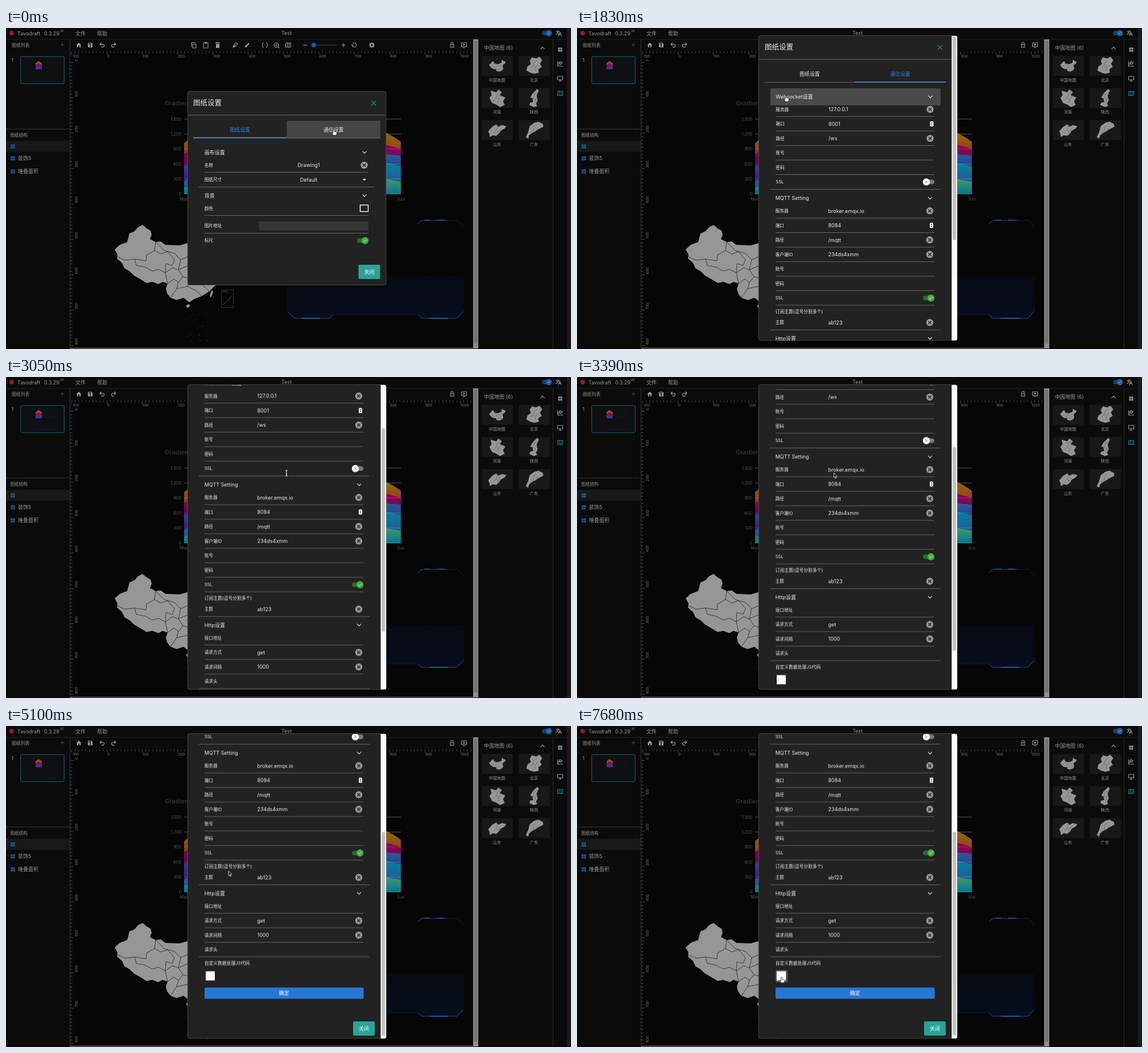
Animation of 993x564 px, one loop 8000 ms. Source, as an HTML page:

```html
<!DOCTYPE html>
<html lang="zh-CN">
<head>
<meta charset="utf-8">
<title>图纸设置</title>
<style>
html, body { margin: 0; width: 100%; height: 100%; overflow: hidden; background: #0b0b0b; }
svg { display: block; }
text { font-family: Inter, 'Noto Sans CJK SC', 'Noto Sans CJK', sans-serif; white-space: pre; }
.ic { fill: none; stroke: #999; stroke-width: 1.1; stroke-linejoin: round; stroke-linecap: round; }
.a { animation: 8s infinite both; }
.small { animation-name: small; animation-timing-function: step-end; }
.big { animation-name: big; animation-timing-function: step-end; }
.out { animation-name: out; }
.in { animation-name: in; }
.bar { animation-name: bar; }
.scroll { --k: -1; animation-name: scroll; }
.thumb { --k: .68; animation-name: scroll; }
.row { animation-name: row; }
.nudge { animation-name: nudge; animation-timing-function: step-end; }
.js { animation-name: js; }
.cursor { animation-name: move; animation-timing-function: ease-in-out; }
.hand { animation-name: hand; animation-timing-function: step-end; }
.beam { animation-name: beam; animation-timing-function: step-end; }
.arrow { animation-name: arrow; animation-timing-function: step-end; }
@keyframes small { 0% { visibility: visible } 3.5%, 100% { visibility: hidden } }
@keyframes big { 0% { visibility: hidden } 3.5%, 100% { visibility: visible } }
@keyframes out {
  0%, 3.5% { transform: none; animation-timing-function: cubic-bezier(.215,.61,.355,1) }
  7.5%, 100% { transform: translateX(-330px) }
}
@keyframes in {
  0%, 3.5% { transform: translateX(330px); animation-timing-function: cubic-bezier(.215,.61,.355,1) }
  7.5%, 100% { transform: none }
}
@keyframes bar {
  0%, 3.5% { transform: translateX(-159px); animation-timing-function: cubic-bezier(.4,0,.2,1) }
  6.7%, 100% { transform: none }
}
@keyframes scroll {
  0%, 36.25% { transform: none; animation-timing-function: cubic-bezier(.4,.3,.7,.8) }
  38.125% { transform: translateY(calc(var(--k) * 109px)); animation-timing-function: cubic-bezier(.08,.6,.3,1) }
  46%, 56.75% { transform: translateY(calc(var(--k) * 163px)); animation-timing-function: cubic-bezier(.3,.3,.5,1) }
  61%, 100% { transform: translateY(calc(var(--k) * 251.5px)) }
}
@keyframes row { 0%, 17.6% { opacity: 0 } 21%, 30% { opacity: 1 } 33%, 100% { opacity: 0 } }
@keyframes nudge { 0% { transform: none } 20% { transform: translateX(.6px) } 33%, 100% { transform: none } }
@keyframes js { 0%, 94% { opacity: 0 } 95.8%, 100% { opacity: 1 } }
@keyframes move {
  0%, 11.375% { transform: translate(576px,178px) }
  21.375%, 29.625% { transform: translate(367px,119px) }
  33.75%, 40% { transform: translate(493px,169px) }
  46%, 49.375% { transform: translate(365px,166px) }
  55%, 60% { transform: translate(422px,189px); animation-timing-function: ease-in }
  63.75% { transform: translate(391px,254px); animation-timing-function: ease-out }
  66.5%, 66.875% { transform: translate(349px,281px) }
  69.625%, 78.5% { transform: translate(360px,292px) }
  88.5%, 88.875% { transform: translate(475px,462px) }
  96%, 100% { transform: translate(359.5px,441px) }
}
@keyframes hand {
  0% { visibility: visible } 12% { visibility: hidden } 18% { visibility: visible }
  30.6% { visibility: hidden } 87.4% { visibility: visible } 90% { visibility: hidden }
  94%, 100% { visibility: visible }
}
@keyframes beam {
  0% { visibility: hidden } 12% { visibility: visible } 16.6% { visibility: hidden }
  31.4% { visibility: visible } 41.8%, 100% { visibility: hidden }
}
@keyframes arrow {
  0% { visibility: hidden } 16.6% { visibility: visible } 18% { visibility: hidden }
  30.6% { visibility: visible } 31.4% { visibility: hidden } 41.8% { visibility: visible }
  87.4% { visibility: hidden } 90% { visibility: visible } 94%, 100% { visibility: hidden }
}
</style>
</head>
<body>
<svg id="stage" width="993" height="564" viewBox="0 0 993 564"></svg>
<script>
const range = (n, f) => Array.from({ length: n }, (_, i) => f(i)).join('');
const text = (x, y, s, size = 9, fill = '#eee', attrs = '') =>
  `<text x="${x}" y="${y + size * .36}" font-size="${size}" fill="${fill}" ${attrs}>${s}</text>`;
const mid = (x, y, s, size, fill, attrs = '') => text(x, y, s, size, fill, 'text-anchor="middle" ' + attrs);
const rect = (x, y, w, h, fill, attrs = '') =>
  `<rect x="${x}" y="${y}" width="${w}" height="${h}" fill="${fill}" ${attrs}/>`;
const hline = (x1, x2, y, c = '#666') => rect(x1, y - .5, x2 - x1, 1, c);
const path = (d, attrs) => `<path d="${d}" ${attrs}/>`;
const at = (x, y, s) => `<g transform="translate(${x} ${y})">${s}</g>`;
const icon = (x, y, d, attrs = '') => at(x, y, path(d, `class="ic" ${attrs}`));

let seed = 7;
const rnd = () => (seed = seed * 16807 % 2147483647) / 2147483647;

// ---------- workspace ----------
const SOLID = 'style="fill:#999;stroke:none"';
const tools = [
  [128, 'M-4.5 0L0-4.2L4.5 0H3.2V4H1V1H-1V4H-3.2V0z', SOLID],
  [148, 'M-4-4H2.4L4-2.4V4H-4zM-2.5-3V-1H1.5V-3zM0 .2A1.4 1.4 0 1 0 .1 .2z', SOLID + ' fill-rule="evenodd"'],
  [169, 'M-1.5-4L-4-1.5L-1.5 1M-4-1.5H1A2.5 2.5 0 0 1 1 3.6H-1'],
  [189, 'M1.5-4L4-1.5L1.5 1M4-1.5H-1A2.5 2.5 0 0 0-1 3.6H1'],
  [330, 'M-2-2H4V5H-2zM-4 2V-4.5H2'],
  [351, 'M-4-4H4V5H-4zM-1.5-5H1.5V-3H-1.5z'],
  [372, 'M-3-2H3V5H-3zM-4-4.5H4V-3H-4z', SOLID],
  [403, 'M-4 4L-2-1L2-4L4-2L1 2zM-4 4L0 0'],
  [424, 'M-4 4V2L2.5-4L4-2.5L-2 4z', SOLID],
  [455, 'M-2.5-4Q-4-4-4-2T-5 0Q-4 0-4 2T-2.5 4M2.5-4Q4-4 4-2T5 0Q4 0 4 2T2.5 4M-1 0H-.9M1 0H1.1'],
  [475, 'M-4 0A4 4 0 1 1 4 0A4 4 0 1 1-4 0M-2 0H2M0-2V2M3 3L5 5'],
  [496, 'M-4.5-3L-1.5-4L1.5-3L4.5-4V3L1.5 4L-1.5 3L-4.5 4zM-1.5-4V3M1.5-3V4'],
  [526, 'M-3 0H3'],
  [593, 'M-3 0H3M0-3V3'],
  [612, 'M-3.5 1A3.7 3.7 0 1 0-2.6-2.6M-4.5-1L-3.5 1L-1.5-.2'],
  [643, 'M-2.6 0A2.6 2.6 0 1 1 2.6 0A2.6 2.6 0 1 1-2.6 0M0-4V-3M0 4V3M-4 0H-3M4 0H3M-3-3L-2-2M3 3L2 2M-3 3L-2 2M3-3L2-2', 'style="stroke-width:1.8"'],
  [784, 'M-3-1H3V4H-3zM-2-1V-3A2 2 0 0 1 2-3V-1M0 1V2'],
  [805, 'M-4.5-4H4.5V2.5H-4.5zM-2 4.5H2M-1-2L1.5-.7L-1 .6z'],
];

const rulers = range(114, i => {
  const x = 177 + 6.21 * (i - 10);
  return rect(x, 41, .7, i % 10 ? 3.5 : 6, '#666');
}) + range(12, i => text(178 + 62.1 * (i - 1) - (i ? 0 : 1), 50, (i - 1) * 100, 6.3, '#777'))
  + range(82, i => rect(113, 60 + 6.22 * i, i % 10 ? 3.5 : 6, .7, '#666'))
  + range(9, i => `<text transform="translate(125.5 ${59 + 62.2 * i}) rotate(-90)" font-size="6.3" fill="#777">${i * 100}</text>`);

// Stacked area chart: [week values, top colour, bottom colour], lowest band first
const series = [
  [[140, 232, 101, 264, 90, 340, 250], '#80ffa5', '#01bfec'],
  [[120, 282, 111, 234, 220, 340, 310], '#00ddff', '#4d77ff'],
  [[320, 132, 201, 334, 190, 130, 220], '#37a2ff', '#7415db'],
  [[220, 402, 231, 134, 190, 230, 120], '#ff0087', '#87009d'],
  [[220, 302, 181, 234, 210, 290, 150], '#ffbf00', '#e03e4c'],
];
const dayX = i => 313 + 63.5 * i;
const clamp = (v, a, b) => Math.min(Math.max(v, Math.min(a, b)), Math.max(a, b));

// Smooth curve through the points, kept between neighbouring values
function curve(ys, order) {
  const control = (i, j) => {
    const k = 2 * i - j;
    const y = k in ys ? clamp(ys[i] + (ys[j] - ys[k]) / 4, ys[i], ys[j]) : ys[i];
    return `${k in ys ? (dayX(i) + (dayX(j) - dayX(k)) / 4) : dayX(i)} ${y}`;
  };
  return order.slice(1).map((j, n) =>
    `C${control(order[n], j)} ${control(j, order[n])} ${dayX(j)} ${ys[j]}`).join('');
}

const week = [0, 1, 2, 3, 4, 5, 6], back = [...week].reverse();
let floor = week.map(() => 292);
const bands = series.map(([values, top, bottom], n) => {
  const ceil = floor.map((y, i) => y - values[i] * .0877);
  const d = `M313 ${ceil[0]}${curve(ceil, week)}L694 ${floor[6]}${curve(floor, back)}z`;
  floor = ceil;
  return `<linearGradient id="band${n}" x2="0" y2="1"><stop stop-color="${top}"/><stop offset="1" stop-color="${bottom}"/></linearGradient>`
    + path(d, `fill="url(#band${n})"`);
}).join('');
const chart = range(6, i => {
  const y = 160 + 26.3 * i;
  return hline(313, 694, y, '#555') + text(308, y, ['1,500', '1,200', 900, 600, 300, 0][i], 7.3, '#555', 'text-anchor="end"');
}) + `<g opacity=".6">${bands}</g>`
  + mid(313, 300, 'Mon', 7.3, '#555') + mid(694, 300, 'Sun', 7.3, '#555')
  + text(279, 132, 'Gradient Stacked Area', 11, '#333', 'font-weight="600"');

const china = `<g id="china" fill="#969696" stroke-linejoin="round">
  <path d="M191 389L200 381L213 376L217 361L226 357L232 350L240 346L247 352L254 356L256 363L253 371L263 376L272 375L280 381L305 382L319 378L340 372L356 357L352 338L362 328L378 342L403 350L400 371L385 382L366 396L362 402L374 405L364 415L375 433L370 450L357 463L344 471L331 476L322 482L312 474L300 478L289 474L283 466L281 458L284 449L275 446L268 450L257 446L247 448L234 440L225 435L218 428L208 422L204 413L195 405L196 398z"/>
  <path fill="none" stroke="#222" stroke-width=".8" d="M196 402L209 408L226 406L246 409L247 399L261 391L263 376M226 406L229 417L244 420L257 427L268 424L280 430L284 449M261 391L272 397L284 393L296 407L292 417L281 414L280 430M263 376L278 391L296 396L307 407L319 402M280 430L293 421L302 425L319 418M284 449L295 441L303 447L300 458L289 474M303 447L311 437L303 425M300 458L319 454M307 407L303 425M311 437L322 440L338 430L352 434M319 402L330 392L345 395L360 390M319 418L335 412L352 418M319 454L324 440M319 454L335 462L344 471M338 430L342 448L357 463M342 448L366 440M330 392L334 412"/>
  <path d="M316 488L321 485L324 488L319 492z"/><path d="M358 470L362 460L364 464L360 474z"/>
</g>`;
const islands = range(70, () => rect(314 + rnd() * 42, 494 + rnd() * 62, .8 + rnd() * 2, .8, '#222'))
  + rect(378.5, 460.5, 21, 31, 'none', 'stroke="#333"')
  + path('M380 464L386 462L390 466M382 486L388 480L393 477L396 470', 'stroke="#555" fill="none"');

const glow = d => path(d, 'fill="none" stroke="#143768" stroke-width="1.5"');
const decor = path('M494 436H805V498L792 511H731L724 504H576L568 511H507L494 498z', 'fill="url(#navy)"')
  + glow('M495 498L507 510H568L575 504') + glow('M724 504L731 510H792L804 498')
  + path('M520 510H552M745 510H777', 'stroke="#245598" stroke-width="1.8"')
  + path('M575 504H724', 'stroke="#0a1a36"')
  + glow('M724 344L731 338H775') + path('M775 338H794L804 350', 'fill="none" stroke="#0e2140"')
  + path('M735 337.5H745M758 337.5H770', 'stroke="#245598" stroke-width="1.5"');

// Province silhouettes, centred on their cards
const provinces = [
  ['中国地图', ''],
  ['北京', 'M-4-15L3-13L9-16L14-10L10-4L13 2L7 6L8 12L0 14L-7 12L-14 8L-12 1L-6-3L-8-9z'],
  ['河南', 'M-12-13L-2-10L2-15L8-10L4-5L14-1L10 6L13 12L5 16L-3 11L-9 9L-14 0L-10-5z'],
  ['陕西', 'M5-16L8-13L4-4L6 4L3 10L5 14L-1 16L-9 12L-7 8L-2 7L-3 1L-7-1L-3-8z'],
  ['山东', 'M-16 2L-9-6L-2-10L2-6L8-9L16-7L13-3L6 1L3 6L-2 10L-8 9L-13 12L-14 6z'],
  ['广东', 'M-8-7L0-13L7-15L15-11L16-6L8-2L2 2L-4 5L-9 9L-11 15L-15 12L-11 4z'],
];
const cards = provinces.map(([name, d], i) => {
  const x = 863.5 + 65 * (i % 2), y = 66.5 + 56.5 * (i >> 1);
  const shape = d
    ? at(x, y, path(d, 'fill="#969696"')
      + path('M-7 5L-2 0L2 3L6-3M-2 0L0-7L5-9M2 3L1 9', 'fill="none" stroke="#444" stroke-width=".5"'))
    : `<use href="#china" transform="translate(${x} ${y}) scale(.135) translate(-297 -405)"/>`;
  return rect(x - 27.5, y - 17.5, 55, 35, '#181818', 'rx="2"') + shape + mid(x - .5, y + 24.5, name, 7.2, '#999');
}).join('');

const blocks = (x, y, c) => [0, 1, 2, 3].map(i =>
  rect(x - 3.6 + 4 * (i % 2), y - 3.6 + 4 * (i >> 1), 3.2, 3.2, c)).join('');

const workspace = rect(0, 0, 993, 564, '#0b0b0b') + rect(113, 41, 708, 521, '#060606') + rulers
  + chart + china + islands + decor
  + hline(0, 986, 20, '#222') + rect(112, 20, 1, 544, '#333') + rect(961, 20, 1, 544, '#2a2a2a')
  + hline(113, 829, 562.5, '#8a8a8a') + rect(986, 0, 7, 564, '#1b1b1b')
  + rect(821, 20, 9, 543, '#8f8f8f') + rect(822.5, 22, 6, 533, '#737373', 'rx="3"')
  + '<circle cx="10" cy="9" r="4" fill="#8c1d33"/>'
  + text(20, 9.5, 'Tavodraft', 9, '#999') + text(67, 9.5, '0.3.29', 9, '#999') + text(95, 5.5, '2D', 5, '#999')
  + text(122, 9.5, '文件', 9, '#999') + text(160, 9.5, '帮助', 9, '#999') + mid(493, 8.5, 'Test', 9, '#999')
  + rect(942, 5, 17, 8, '#123f70', 'rx="4"') + '<circle cx="954" cy="9" r="5.5" fill="#1a5ca8"/>'
  + icon(954, 9, 'M-2 0L-.5 1.5L2-1.5')
  + icon(971, 9, 'M-4.5-3H2M-1.2-4.5V-3M.7-3Q-1 1-4.5 2.5M-3-1.5Q-1 1 1 2M0 4.5L2.5-1.5L5 4.5M1 2.5H4')
  + text(10, 30, '图纸列表', 7.8, '#999') + icon(99, 29.5, 'M-3 0H3M0-3V3', 'style="stroke:#444"')
  + text(9.5, 57, '1', 9, '#999') + rect(25.8, 50.2, 76.4, 47.7, '#0e1013', 'stroke="#1a6478" rx="2"')
  + path('M52 62L57 58L63 62V66H52z', 'fill="#9a5414"') + path('M52 65L57 62L63 65V69H52z', 'fill="#93084f"')
  + path('M52 69L57 67L63 68V72.5H52z', 'fill="#3a36a0"')
  + range(4, i => hline(67, 88, 57 + 4.5 * i, '#171717')) + path('M56 92H66M70 92H87', 'stroke="#111e3c"')
  + hline(0, 112, 177.5, '#333') + text(7.5, 188, '图纸结构', 7.6, '#999') + rect(0, 198, 112, 19.5, '#191919')
  + [208, 229, 252].map(y => blocks(12, y, '#1a62a8')).join('')
  + text(21, 229, '装饰5', 9, '#999') + text(21, 252, '堆叠面积', 9, '#999')
  + tools.map(([x, d, a]) => icon(x, 30, d, a)).join('')
  + hline(535, 583, 30, '#444') + '<circle cx="541" cy="30" r="4" fill="#1a5ca8"/>'
  + text(840, 35, '中国地图 (6)', 9, '#999') + icon(943, 35, 'M-3 1.5L0-1.5L3 1.5') + cards
  + blocks(974, 38, '#999') + icon(974, 63, 'M-4.5-4V4H4.5M-3 2L-1-1L1 1L4-3M-3-1L0-4L2-2')
  + icon(974, 89, 'M-4.5-4H4.5V2H-4.5zM0 2V4.5M-2 4.5H2') + icon(974, 115, tools[11][1], 'style="stroke:#1f7f92"');

// ---------- dialog ----------
const BLUE = '#2a86e0', TEAL = '#2ba398';
const label = (y, s, size = 7.65) => text(348.7, y, s, size);
const chevron = (x, y) => icon(x, y, 'M-3.2-1.6L0 1.6L3.2-1.6', 'style="stroke:#eee"');
const clear = (x, y) => at(x, y, '<circle r="6.2" fill="#9a9a9a"/>'
  + path('M-2.6-2.6L2.6 2.6M2.6-2.6L-2.6 2.6', 'stroke="#222" stroke-width="1.4"'));
const toggle = (x, y, on) => rect(x - 10, y - 4, 20, 8, on ? '#2c6a2f' : '#7a7a7a', 'rx="4"')
  + at(x + (on ? 4 : -4), y, `<circle r="6.2" fill="${on ? '#45ad4a' : '#fff'}"/>`
    + path(on ? 'M-2.6 .2L-.8 2L2.6-1.8' : 'M-2-2L2 2M2-2L-2 2', `fill="none" stroke="${on ? '#fff' : '#777'}"`));
const spinner = y => rect(620, y - 4.5, 6, 9, '#fff', 'rx="1.5"')
  + path(`M621.3 ${y - 1}L623 ${y - 3}L624.7 ${y - 1}zM621.3 ${y + 1}L623 ${y + 3}L624.7 ${y + 1}z`, 'fill="#222"');
const button = (x, y) => rect(x, y, 38, 25, TEAL, 'rx="2"') + mid(x + 19, y + 12.5, '关闭', 9, '#fff', 'font-weight="500"');
const cross = (x, y) => icon(x, y, 'M-3.8-3.8L3.8 3.8M3.8-3.8L-3.8 3.8', `style="stroke:${TEAL}"`);
const tabs = (x, w, y, active) => ['图纸设置', '通信设置'].map((s, i) =>
  mid(x + w * (i + .5), y, s, 8.9, i == active ? BLUE : '#eee', 'font-weight="500"')).join('');

const canvasPanel = '<g id="canvasPanel">' + text(348.7, 218.5, '画布设置') + chevron(630, 218.5)
  + label(241, '名称') + mid(532, 241, 'Drawing1') + clear(629.5, 241) + hline(349, 637, 253.5)
  + label(266.5, '图纸尺寸') + mid(532, 266.5, 'Default') + path('M626.5 265H633L629.8 268.5z', 'fill="#eee"')
  + hline(339, 648, 279.5) + text(348.7, 294.5, '背景') + chevron(630, 294.5)
  + label(317, '颜色') + rect(622.5, 311, 14, 11.5, 'none', 'stroke="#fff" stroke-width="1.4"') + hline(349, 637, 329.5)
  + label(347.5, '图片地址') + rect(445, 340, 192, 15.5, '#373737') + hline(349, 637, 360.5)
  + label(373.5, '标尺') + toggle(627, 373.5, true) + '</g>';

const STEP = 25.5;
const fields = (y, list) => list.map(([name, value, end], i) => {
  const c = y + STEP * i;
  return label(c, name) + (value ? text(441.5, c, value) + (end ? spinner(c) : clear(620, c)) : '');
}).join('');
const rules = (y, n) => range(n, i => hline(349, 628, y + STEP * i));
const section = (y, s) => text(348.7, y, s) + chevron(620.5, y);

const linkPanel = `<g class="a row">${rect(340, 106, 299, 30, '#4a4a4a')}</g><g class="a nudge">`
  + section(121, 'Websocket设置')
  + fields(143, [['服务器', '127.0.0.1'], ['端口', '8001', 1], ['路径', '/ws'], ['账号'], ['密码'], ['SSL']])
  + '</g>' + rules(155.5, 5) + toggle(618, 270.5, false) + hline(339, 639, 283.5)
  + section(299, 'MQTT Setting')
  + fields(321.3, [['服务器', 'broker.emqx.io'], ['端口', '8084', 1], ['路径', '/mqtt'], ['客户端ID', '234ds4xmm'], ['账号'], ['密码'], ['SSL']])
  + rules(334, 7) + toggle(618, 474.5, true)
  + label(498.5, '订阅主题(逗号分割多个)', 7.8) + fields(517.5, [['主题', 'ab123']]) + hline(339, 639, 530.5)
  + section(545.5, 'Http设置')
  + fields(568, [['接口地址'], ['请求方式', 'get'], ['请求间隔', '1000'], ['请求头']])
  + rules(580.5, 3) + hline(339, 639, 657)
  + label(668.5, '自定义数据处理JS代码', 7.8)
  + `<g class="a js">${rect(349, 680.5, 21, 21, '#5c5c5c', 'rx="2"')}</g>` + rect(351, 682.5, 16, 16, '#fff')
  + rect(349, 711, 279.5, 20, '#2877d4', 'rx="1.5"') + mid(488.5, 721, '确定', 9, '#fff', 'font-weight="500"');

const card = (y, h) => rect(319.3, y, 348.6, h, '#222', 'rx="3" stroke="#484848"');

const small = '<g class="a small">' + card(111.5, 340)
  + text(329, 131, '图纸设置', 12.5) + cross(646.5, 132) + hline(320, 667, 153)
  + rect(493.5, 163, 164.5, 31, '#454545') + hline(329, 658, 193.5, '#666') + tabs(329, 164.5, 178.5, 0)
  + rect(329, 191.8, 164.5, 1.7, BLUE) + canvasPanel + button(619.5, 416) + '</g>';

const big = '<g class="a big">' + card(13.5, 535.3)
  + '<g clip-path="url(#view)"><g class="a scroll">'
  + text(330, 33.5, '图纸设置', 12.5) + cross(638, 34) + hline(320, 658, 55)
  + tabs(329.5, 159, 80.5, 1) + hline(330, 648, 95.5, '#666')
  + `<g class="a bar">${rect(488.5, 94, 160, 1.7, BLUE)}</g>`
  + '<g clip-path="url(#panels)">'
  + '<g class="a out"><use href="#canvasPanel" transform="translate(-5 -98)"/></g>'
  + `<g class="a in">${linkPanel}</g></g>` + button(610, 770.5) + '</g>'
  + rect(658.5, 14, 10, 535, '#fafafa') + `<g class="a thumb">${rect(660.3, 15, 6, 358, '#c1c1c1', 'rx="3"')}</g>`
  + '</g></g>';

const cursor = '<g class="a cursor">'
  + path('M0 0Q1 .2 1 1.5V4Q2.2 3.4 2.7 4.4Q4 4 4.3 5Q5.6 4.8 5.5 6.2Q5.4 8.6 4.2 10.2H-.6Q-1.6 8.4-3.2 6.6Q-2.4 5.4-1 6.8V1.5Q-1 .2 0 0z', 'class="a hand" fill="#fff" stroke="#111" stroke-width=".7"')
  + path('M-2-5Q0-5 0-3.6Q0-5 2-5M0-4V4M-2 5Q0 5 0 3.6Q0 5 2 5M-1 1H1', 'class="a beam" fill="none" stroke="#eee" stroke-width="1.1"')
  + path('M.5 .3V8.6L2.3 7L3.6 10L5 9.4L3.7 6.5H6.2z', 'class="a arrow" fill="#111" stroke="#eee" stroke-width=".8"')
  + '</g>';

const defs = `<defs>
  <linearGradient id="navy" x2="0" y2="1"><stop stop-color="#070a12"/><stop offset="1" stop-color="#070d1c"/></linearGradient>
  <clipPath id="view"><rect x="319" y="14" width="349.4" height="535" rx="3"/></clipPath>
  <clipPath id="panels"><rect x="330" y="98" width="319" height="672"/></clipPath>
</defs>`;

document.getElementById('stage').innerHTML = defs + workspace + small + big + cursor;
</script>
</body>
</html>
```
